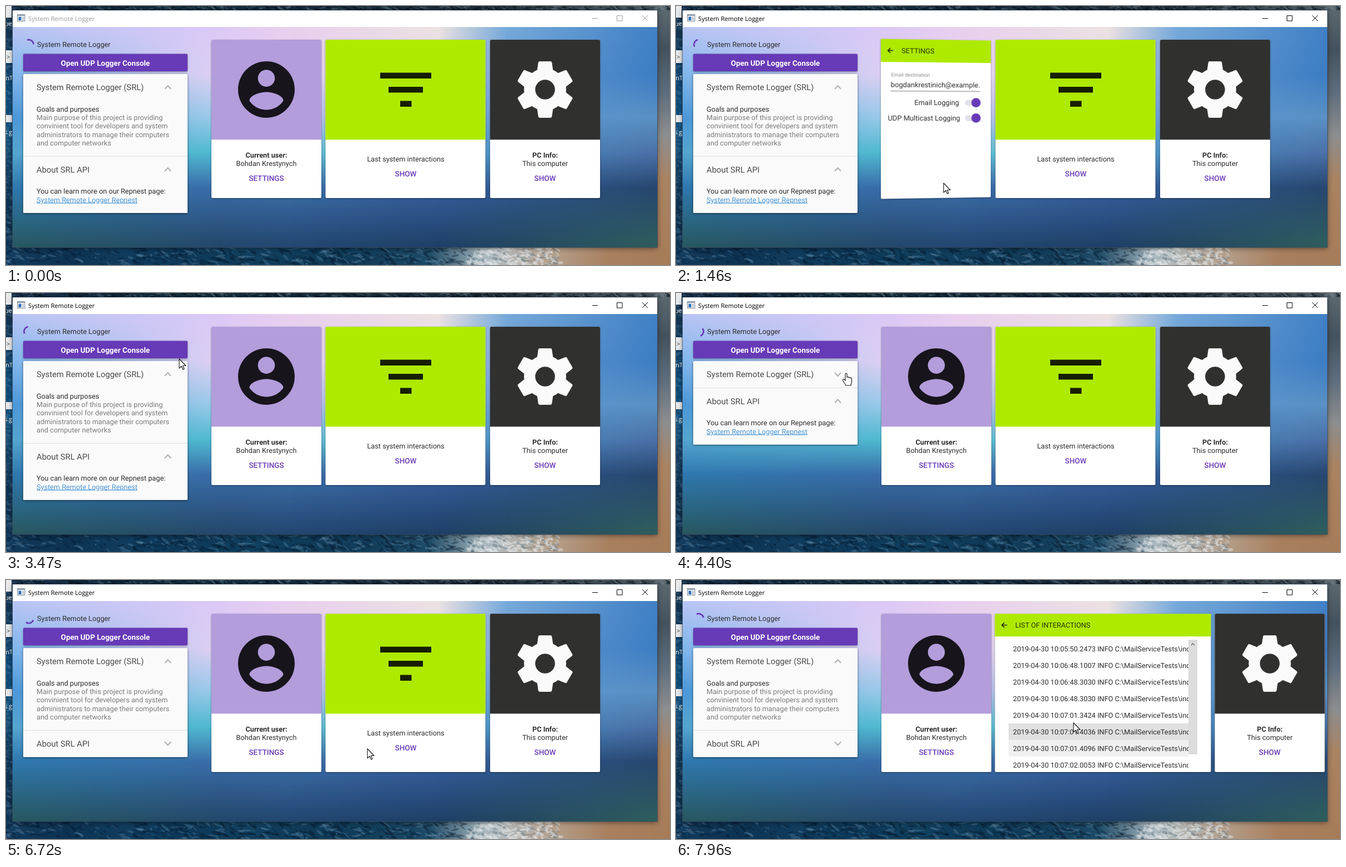
Recreate the animation shown at these times as an HTML page with a canvas. Size 1196 px wide and 468 px high, loop 8 s.

```html
<!DOCTYPE html>
<html lang="en">
<head>
<meta charset="utf-8">
<title>System Remote Logger</title>
<style>
html, body { margin: 0; width: 100%; height: 100%; overflow: hidden; }
#stage { position: relative; width: 1196px; height: 468px; overflow: hidden; background: #12344f; }
#stage canvas, #stage svg { position: absolute; left: 0; top: 0; }
#frame { position: absolute; left: 12px; top: 8px; width: 1161px; height: 428px;
  box-shadow: 0 0 0 1px rgba(60,75,95,.75), 0 2px 9px rgba(0,0,0,.45); background: #fff; }
#client { position: absolute; left: 12px; top: 38px; width: 1161px; height: 398px; overflow: hidden; }
#client > .col { position: absolute; inset: 0; }
#client > svg { left: -12px; top: -38px; }
.card { filter: drop-shadow(0 1px 1.5px rgba(0,0,0,.4)); }
#panel { position: absolute; left: 19px; top: 85px; width: 296px; height: 251px; overflow: hidden;
  background: #fafafa; border-radius: 2px; }
#panelShade { position: absolute; left: 19px; top: 85px; width: 296px; border-radius: 2px;
  box-shadow: 0 1px 4px rgba(0,0,0,.5); }
#panel svg { left: -31px; top: -123px; }
text { font: 12.75px Roboto, sans-serif; fill: #2c2c2c; white-space: pre; text-rendering: geometricPrecision; }
.mid { text-anchor: middle; }
.end { text-anchor: end; }
.bold { font-weight: 700; }
.head { font-size: 14.8px; fill: #4a4a4a; }
.dim { fill: #7b7b7b; }
.act { font-size: 13.5px; font-weight: 500; fill: #673ab7; text-anchor: middle; }
.link { fill: #4b97d6; text-decoration: underline; }
.tiny { font-size: 9px; fill: #8a8a8a; }
.bar { fill: #273300; }
.chev { fill: none; stroke: #b0b0b0; stroke-width: 2; }
.title { font: 11.2px "Open Sans", sans-serif; fill: inherit; }
</style>
</head>
<body>
<div id="stage"></div>
<script>
const stage = document.getElementById('stage');
const W = 1196, H = 468, LOOP = 8000;

// ---- markup helpers ----
const text = (x, y, s, cls = '') => `<text x="${x}" y="${y}" class="${cls}">${s}</text>`;
const rect = (x, y, w, h, fill, extra = '') =>
  `<rect x="${x}" y="${y}" width="${w}" height="${h}" fill="${fill}" ${extra}/>`;
const svg = (id, body, cls = '') =>
  `<svg id="${id}" class="${cls}" width="${W}" height="${H}" viewBox="0 0 ${W} ${H}">${body}</svg>`;
const backArrow = (x, y) =>
  `<path d="M${x + 5} ${y}H${x - 4}M${x} ${y - 4.5}L${x - 4.5} ${y}L${x} ${y + 4.5}" fill="none" stroke="#1c2500" stroke-width="1.6"/>`;
const chevron = (id, y) => `<path id="${id}" class="chev" d="M286 ${y + 3}L291.5 ${y - 3}L297 ${y + 3}"/>`;
const tile = (x, w, color) =>
  rect(x, 61, w, 286, '#fff', 'rx="2"') + `<path d="M${x} 241.5V63a2 2 0 0 1 2-2h${w - 4}a2 2 0 0 1 2 2V241.5Z" fill="${color}"/>`;
const sheet = (x, w, title) =>
  rect(x, 61, w, 286, '#fff', 'rx="2"') + rect(x, 61, w, 41, '#aeea00') +
  backArrow(x + 17, 81.5) + text(x + 36.5, 86, title, 'bar');
const toggle = y => rect(521, y - 5, 26, 10.5, '#e4e1ea', 'rx="5"') +
  `<circle cx="541" cy="${y}" r="8.5" fill="#673ab7"/>`;

// ---- card faces ----
const ink = 'rgba(0,0,0,.87)';
const userFront = tile(370, 198, '#b39ddb') +
  `<path transform="translate(407.8 89.8) scale(5.1)" fill="${ink}" d="M12 2C6.48 2 2 6.48 2 12s4.48 10 10 10 10-4.48 10-10S17.52 2 12 2zm0 3c1.66 0 3 1.34 3 3s-1.34 3-3 3-3-1.34-3-3 1.34-3 3-3zm0 14.2c-2.5 0-4.71-1.28-6-3.22.03-1.99 4-3.08 6-3.08 1.99 0 5.97 1.09 6 3.08-1.29 1.94-3.5 3.22-6 3.22z"/>` +
  text(469, 274, 'Current user:', 'mid bold') + text(469, 289, 'Bohdan Krestynych', 'mid') +
  rect(422, 295, 94, 32, 'rgba(0,0,0,.14)', 'id="press1" rx="2"') + text(469, 316, 'SETTINGS', 'act');

const userBack = sheet(370, 198, 'SETTINGS') + text(388, 128, 'Email destination', 'tiny') +
  `<clipPath id="field"><rect x="387" y="130" width="162" height="24"/></clipPath><g clip-path="url(#field)">` +
  text(387.5, 147, 'bogdankrestinich@example.com') + '</g>' + rect(387, 153.5, 162, 1, '#777') +
  text(510, 179, 'Email Logging', 'end') + toggle(174.5) +
  text(512, 207, 'UDP Multicast Logging', 'end') + toggle(202.5);

const listFront = tile(575.5, 288, '#aeea00') +
  rect(674, 120.5, 92, 10.5, ink) + rect(689, 146, 62, 10.5, ink) + rect(710, 171.5, 20.5, 10.5, ink) +
  text(720, 281, 'Last system interactions', 'mid') +
  rect(686, 287, 68, 34, 'rgba(0,0,0,.16)', 'id="press2" rx="2"') + text(720, 308, 'SHOW', 'act');

const stamps = ['05:50.2473', '06:48.1007', '06:48.3030', '06:48.3030', '07:01.3424', '07:01.4036', '07:01.4096', '07:02.0053'];
const listBack = sheet(574.5, 389, 'LIST OF INTERACTIONS') +
  '<clipPath id="rows"><rect x="599" y="106" width="324" height="236"/></clipPath><g clip-path="url(#rows)">' +
  stamps.map((s, i) => rect(599, 109 + 30 * i, 324, 30, '#e1e1e1', `class="row" opacity="0"`) +
    text(607, 128.5 + 30 * i, `2019-04-30 10:${s} INFO C:\\MailServiceTests\\index`)).join('') + '</g>' +
  rect(923, 108, 16, 207, '#dcdcdc') +
  '<path d="M928 118l3-3.5 3 3.5" fill="none" stroke="#777" stroke-width="1.4"/>';

const teeth = [0, 60, 120, 180, 240, 300].map(a =>
  `<path transform="rotate(${a})" d="M-9.8-48.5H9.8L13-27H-13Z"/>`).join('');
const pcFront = tile(872, 198, '#30302f') +
  `<g transform="translate(971 151)" fill="#fafafa" stroke="#fafafa" stroke-width="5" stroke-linejoin="round">${teeth}<circle r="35.5"/><circle r="17.8" fill="#30302f" stroke="none"/></g>` +
  text(971, 274, 'PC Info:', 'mid bold') + text(971, 289, 'This computer', 'mid') + text(971, 316, 'SHOW', 'act');

// ---- left side ----
const prose = ['Main purpose of this project is providing', 'convinient tool for developers and system',
  'administrators to manage their computers', 'and computer networks'];
const side = '<path id="spin" fill="none" stroke="#673ab7" stroke-width="2.6" d="M-6.9-5.1A8.6 8.6 0 0 1 6.9-5.1"/>' +
  text(56, 73.5, 'System Remote Logger') +
  rect(31, 86.5, 296, 31.5, '#673ab7', 'rx="2" class="card"') +
  `<text x="179" y="108.2" class="mid bold" style="font-size:13.5px;fill:#fff">Open UDP Logger Console</text>`;
const panel = text(55, 152.3, 'System Remote Logger (SRL)', 'head') + chevron('chev1', 147) +
  '<g id="body1">' + text(55, 190.5, 'Goals and purposes') +
  prose.map((s, i) => text(55, 206 + 15.3 * i, s, 'dim')).join('') + '</g>' +
  '<g id="about">' + rect(31, 271, 296, 103, '#fafafa') + rect(31, 271, 296, 1, '#e0e0e0') +
  text(55, 301, 'About SRL API', 'head') + chevron('chev2', 295.5) +
  '<g id="body2">' + text(55, 339, 'You can learn more on our Repnest page:') +
  text(55, 354.5, 'System Remote Logger Repnest', 'link') + '</g></g>';

const bar = rect(20.5, 15.5, 13.5, 12, '#f4f6f8', 'stroke="#7a8794"') + rect(21, 16, 12.5, 2, '#9aa7b4') +
  rect(22.5, 19.5, 5, 6.5, '#2f6fb5') + rect(29, 19.5, 3.5, 6.5, '#c3cbd3') +
  '<g id="caption">' + text(40, 26.5, 'System Remote Logger', 'title') +
  '<path d="M1056 22.5H1066M1100.5 17.5H1110V27H1100.5ZM1146 17L1156 27M1156 17L1146 27" fill="none" stroke="currentColor"/></g>';

const cursor = '<g id="cursor" fill="#fff" stroke="#111" stroke-width="1.1" stroke-linejoin="round">' +
  '<path id="arrow" d="M0 0V17L4 13.3L6.6 19.3L9 18.2L6.5 12.5H12Z"/>' +
  '<path id="hand" d="M-2 1.5C-2-.5 1-.5 1 1.5V7.5C1 6 4 6 4 8C4 6.8 6.8 7 6.8 9C7 8 9.5 8 9.5 10V15C9.5 18 8 19 8 22H-1.5C-1.5 20-6 15-6.5 12.5C-7 10.5-4.5 10-3.5 11.5L-2 13.5Z"/></g>';

// Backdrop: vertical blends that fade into each other from left to right.
const cols = [
  [0, '#b9c6f4 #7fb6ec #4b97d8 #55a5d0 #2e78ae #28585f'],
  [370, '#dcc8f6 #dfd0f2 #9ccbe9 #4fbad0 #3a6ca8 #23476a'],
  [500, '#e9cfee #e4d2f0 #bcc4ea #62c0d2 #3c6eaa #224670'],
  [768, '#ece2e0 #e0d8ee #a5b4e2 #55b0d0 #365f9f #1f3f66'],
  [888, '#78aada #6aa0d6 #5c98d2 #4a8cc0 #30588f #234660'],
  [1161, '#4080c4 #3c7cc2 #5a90c4 #4a70a8 #27466e #2f5e5c']];
const levels = [0, 22, 41, 57, 73, 100];
const backdrop = cols.map(([x, list], i) => {
  const stops = list.split(' ').map((c, k) => `${c} ${levels[k]}%`).join();
  const fade = i ? `linear-gradient(90deg,transparent ${cols[i - 1][0]}px,#000 ${x}px)` : 'none';
  return `<div class="col" style="background:linear-gradient(${stops});-webkit-mask-image:${fade};mask-image:${fade}"></div>`;
}).join('');

stage.innerHTML = `<canvas width="${W}" height="${H}"></canvas><div id="frame"></div>${svg('bar', bar)}
  <div id="client">${backdrop}${svg('side', side)}<div id="panelShade"></div><div id="panel">${svg('inner', panel)}</div>
  ${svg('userFront', userFront, 'card')}${svg('userBack', userBack, 'card')}
  ${svg('listFront', listFront, 'card')}${svg('listBack', listBack, 'card')}${svg('pc', pcFront, 'card')}</div>
  ${svg('top', cursor)}`;
const $ = id => document.getElementById(id);

// ---- desktop around the window ----
function paintDesktop() {
  const c = stage.querySelector('canvas').getContext('2d');
  let seed = 7;
  const rnd = () => (seed = seed * 16807 % 2147483647) / 2147483647;
  const fill = (x, y, w, h, vertical, colors) => {
    const g = vertical ? c.createLinearGradient(0, 0, 0, H) : c.createLinearGradient(0, 0, W, 0);
    colors.split(' ').forEach((s, i, all) => g.addColorStop(i / (all.length - 1), s));
    c.fillStyle = g;
    c.fillRect(x, y, w, h);
  };
  fill(0, 0, W, 30, false, '#1b3550 #12293d #15303f #12283a #1c2f3d #1a2731 #39474f #55636a');
  fill(0, 430, W, 38, false, '#123a5c #0d3352 #103c5e #0d3858 #11405f #0f3a58 #123d5a #1d4a66 #b4c0c5 #b5a18e #a87f5e #a67c58');
  fill(0, 8, 14, 430, true, '#1a3146 #12395a #0e4a78 #14507c #12395a #0d2f4c #123a5c');
  fill(1170, 0, 26, 440, true, '#5d6a70 #44525e #5d6d7c #8d8e8f #a98362 #a87f5d #a67c58');
  const blot = (x, y, rx, ry, color) => {
    c.fillStyle = color;
    c.beginPath();
    c.ellipse(x, y, rx, ry, rnd() * 1.2 - .3, 0, 7);
    c.fill();
  };
  for (let i = 0; i < 420; i++) {
    blot(rnd() * 850, 437 + rnd() * 31, 2 + rnd() * 9, .6 + rnd() * 2, i % 3 ? 'rgba(4,24,42,.35)' : 'rgba(110,155,185,.28)');
    blot(rnd() * W, rnd() * 8, 2 + rnd() * 7, .5 + rnd() * 1.5, i % 3 ? 'rgba(4,14,24,.35)' : 'rgba(130,155,170,.28)');
  }
  for (let i = 0; i < 200; i++) {
    const x = 830 + rnd() * 170;
    blot(x, 437 + rnd() * 31, 1 + rnd() * 7, .6 + rnd() * 2.4, i % 4 ? 'rgba(228,232,234,.5)' : 'rgba(80,105,120,.35)');
    blot(rnd() * 12, rnd() * H, 1 + rnd() * 4, .6 + rnd() * 2, 'rgba(110,160,200,.16)');
  }
  c.fillStyle = '#e8eaec';
  c.fillRect(0, 0, 10, 21);
  c.fillRect(0, 80, 12, 23);
  c.fillRect(0, 197, 11, 13);
  c.font = '11px "Open Sans", sans-serif';
  c.fillStyle = '#fff';
  c.fillText('ue', -2, 36);
  c.fillText('enT', -7, 134);
  c.fillText('s.g', -3, 232);
  c.fillStyle = '#333';
  c.fillText('>', 1, 96);
}

// ---- motion ----
const clamp = v => Math.min(1, Math.max(0, v));
const ease = v => (1 - Math.cos(Math.PI * clamp(v))) / 2;
const ramp = (t, start, dur) => ease((t - start) / dur);
const within = (t, spans) => spans.some(([a, b]) => t >= a && t < b);
const show = (id, on) => { $(id).style.display = on ? '' : 'none'; };

const path = [[70, 846, 411], [480, 600, 350], [840, 482, 320], [1740, 482, 320], [2330, 384, 81], [2760, 384, 81],
  [3420, 312, 118], [3800, 307, 145], [5180, 307, 145], [5700, 281, 305], [6130, 281, 305], [6950, 733, 305],
  [7780, 733, 305], [7950, 716, 258]];
const handSpans = [[780, 1240], [2290, 2500], [3560, 5270], [5620, 6240], [6850, 7578]];

function pointAt(t) {
  const i = path.findIndex(p => p[0] > t);
  if (i < 0) return path[path.length - 1].slice(1);
  if (!i) return null;
  const [t0, x0, y0] = path[i - 1], [t1, x1, y1] = path[i];
  const k = ease((t - t0) / (t1 - t0));
  return [x0 + (x1 - x0) * k, y0 + (y1 - y0) * k];
}

// A 45 degree camera looks at the card; light falls off with the tilt.
function pose(name, angle, front, back) {
  const far = angle > 90;
  show(name + 'Front', !far);
  show(name + 'Back', far);
  const [x, w] = far ? back : front;
  const style = $(name + (far ? 'Back' : 'Front')).style;
  const tilt = far ? 180 - angle : -angle;
  const light = Math.cos(tilt * Math.PI / 180);
  style.transformOrigin = `${x + w / 2}px 204px`;
  style.transform = tilt ? `perspective(${w * 1.2071}px) rotateY(${tilt}deg)` : 'none';
  style.filter = tilt ? `brightness(${light}) drop-shadow(0 1px 1.5px rgba(0,0,0,.4))` : '';
}

function draw(t) {
  $('spin').setAttribute('transform', `translate(41 69.5) rotate(${33 + t * .18})`);
  const active = t >= 1000 ? '#000' : '#9a9a9a';
  $('caption').style.color = $('caption').style.fill = active;

  const listAngle = 180 * ramp(t, 7380, 400);
  pose('user', 180 * (ramp(t, 1084, 400) - ramp(t, 2420, 400)), [370, 198], [370, 198]);
  pose('list', listAngle, [575.5, 288], [574.5, 389]);
  $('pc').style.transform = listAngle > 90 ? 'translateX(98.5px)' : 'none';
  show('press1', within(t, [[1000, 1284]]));
  show('press2', within(t, [[7300, 7580]]));
  const rows = document.querySelectorAll('.row');
  const moved = clamp((t - 7900) / 60);
  rows[6].setAttribute('opacity', 1 - .5 * moved);
  rows[5].setAttribute('opacity', moved);

  const fold1 = ramp(t, 4100, 260) - ramp(t, 5070, 260);
  const fold2 = ramp(t, 5980, 260);
  $('panel').style.height = $('panelShade').style.height = `${251 - 100 * fold1 - 54 * fold2}px`;
  $('about').setAttribute('transform', `translate(0 ${-100 * fold1})`);
  $('body1').setAttribute('opacity', 1 - fold1);
  $('body2').setAttribute('opacity', 1 - fold2);
  $('chev1').setAttribute('transform', `rotate(${180 * fold1} 291.5 147)`);
  $('chev2').setAttribute('transform', `rotate(${180 * fold2} 291.5 295.5)`);

  const at = pointAt(t), hand = within(t, handSpans);
  show('cursor', at);
  show('hand', hand);
  show('arrow', !hand);
  if (at) $('cursor').setAttribute('transform', `translate(${at.map(Math.round)})`);
}

paintDesktop();
const begin = performance.now();
function tick() {
  draw((performance.now() - begin) % LOOP);
  requestAnimationFrame(tick);
}
tick();
</script>
</body>
</html>
```
